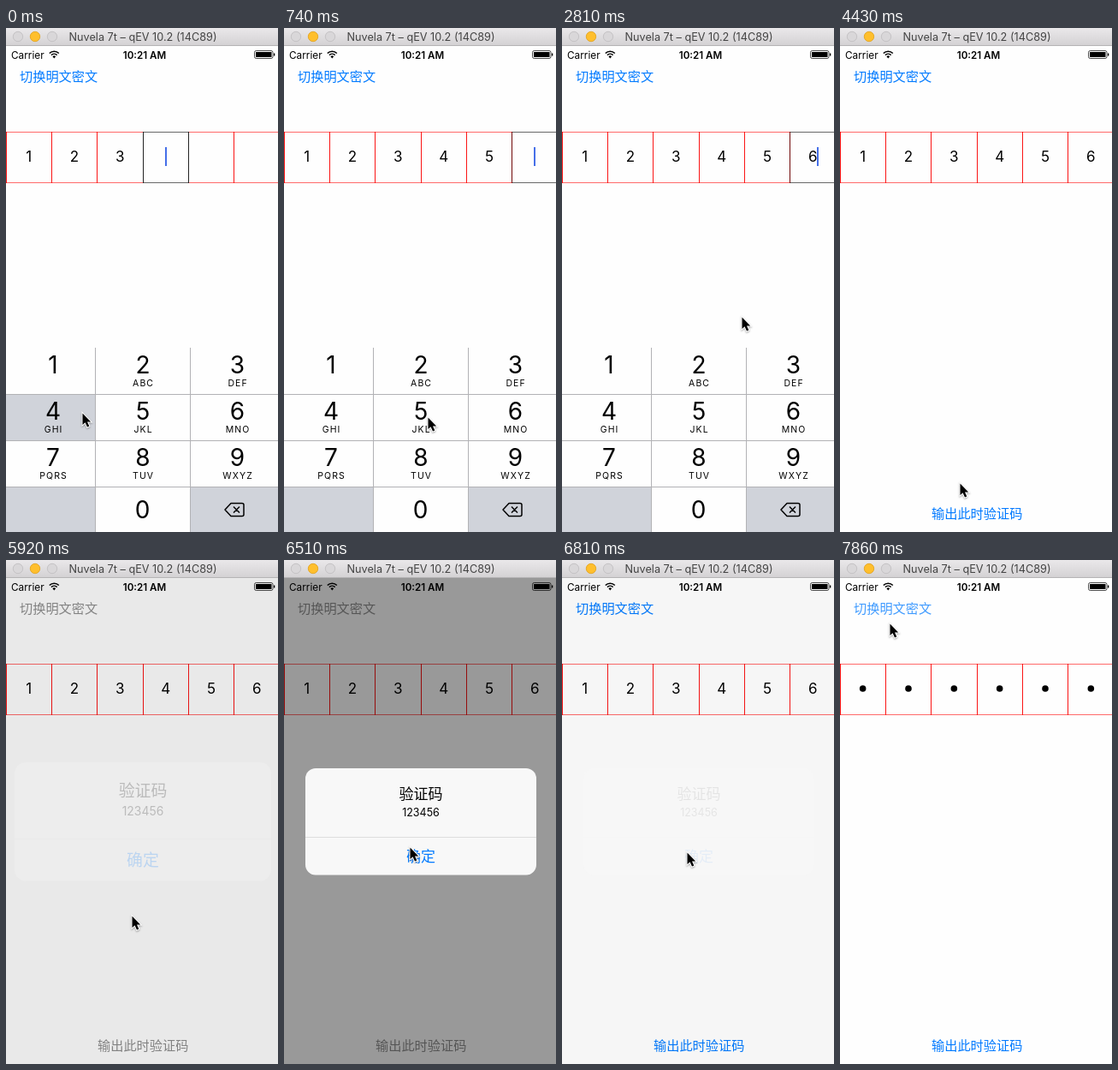
Write an HTML page with a canvas that moves like this. It is 318 px wide and 588 px high and loops after 8000 ms.

```html
<!DOCTYPE html>
<html lang="zh">
<head>
<meta charset="utf-8">
<style>
  html, body { margin: 0; width: 100%; height: 100%; overflow: hidden; background: #fefefe; }
  canvas { display: block; }
</style>
</head>
<body>
<canvas id="stage" width="318" height="588"></canvas>
<script>
const ctx = document.getElementById('stage').getContext('2d');
const LOOP = 8000, STEP = 148;
const LATIN = 'Inter, Roboto, sans-serif';
const CJK = '"Noto Sans CJK SC", "Noto Sans CJK", sans-serif';
const BLUE = '#007aff', KEY_GRAY = '#d0d3da';

// Pointer path: time, x, y of the tip.
const PATH = [
  [0, 89, 449], [300, 105, 450], [590, 162, 454], [740, 168, 454], [1036, 246, 452],
  [1184, 252, 453], [1480, 252, 453], [1776, 258, 569], [1924, 252, 560], [2220, 218, 380],
  [2368, 212, 338], [2812, 210, 337], [3108, 140, 332], [3400, 103, 325], [3850, 103, 325],
  [4144, 122, 440], [4440, 140, 531], [4736, 148, 562], [5180, 148, 562], [5620, 147, 415],
  [5920, 147, 415], [6220, 148, 342], [6512, 147, 335], [6660, 146, 340], [6808, 146, 341],
  [6956, 92, 128], [7252, 56, 76], [7400, 48, 58], [7696, 48, 58], [7844, 58, 74]
];
// Digit, press time, entry time.
const TYPED = [[4, 0, 148], [5, 590, 735], [6, 1030, 1180]];
const KEYBOARD_HIDE = 3680;
const LETTERS = ['', 'ABC', 'DEF', 'GHI', 'JKL', 'MNO', 'PQRS', 'TUV', 'WXYZ'];
const COLUMNS = [0, 105, 216, 318], KEY_X = [55, 160, 270.5];

const clamp = v => Math.max(0, Math.min(1, v));
const progress = (t, from, to) => clamp((t - from) / (to - from));
const within = (t, from, to) => t >= from && t < to;

function pointerAt(t) {
  const i = PATH.findIndex(p => p[0] > t);
  if (i < 0) return PATH[PATH.length - 1].slice(1);
  const [t0, x0, y0] = PATH[i - 1], [t1, x1, y1] = PATH[i];
  const p = (t - t0) / (t1 - t0);
  return [x0 + (x1 - x0) * p, y0 + (y1 - y0) * p];
}

function rect(color, x, y, w, h) {
  ctx.fillStyle = color;
  ctx.fillRect(x, y, w, h);
}

function circle(x, y, r, fill, stroke) {
  ctx.beginPath();
  ctx.arc(x, y, r, 0, Math.PI * 2);
  ctx.fillStyle = fill;
  ctx.fill();
  if (stroke) { ctx.strokeStyle = stroke; ctx.lineWidth = 1; ctx.stroke(); }
}

function text(str, x, y, size, { color = '#000', family = LATIN, weight = 400, align = 'center', spacing = 0 } = {}) {
  ctx.font = `${weight} ${size}px ${family}`;
  ctx.textAlign = align;
  ctx.letterSpacing = spacing + 'px';
  ctx.fillStyle = color;
  ctx.fillText(str, x, y);
}

function titleBar() {
  const shade = ctx.createLinearGradient(0, 0, 0, 20);
  shade.addColorStop(0, '#eae8ea');
  shade.addColorStop(1, '#d4d2d4');
  rect(shade, 0, 0, 318, 20);
  rect('#b5b4b5', 0, 20, 318, 1);
  circle(14, 10, 5.7, '#d9d7d9', '#c5c3c5');
  circle(34, 10, 5.7, '#ffbf2d', '#e5a92a');
  circle(54, 10, 5.7, '#d9d7d9', '#c5c3c5');
  text('Nuvela 7t – qEV 10.2 (14C89)', 160, 15, 12.7, { color: '#444' });
}

function statusBar() {
  text('Carrier', 6, 35.5, 11.8, { align: 'left' });
  text('10:21 AM', 162, 35.5, 11.6, { weight: 600 });
  ctx.strokeStyle = '#000';
  ctx.lineWidth = 1.6;
  for (const r of [4.7, 7.8]) {
    ctx.beginPath();
    ctx.arc(56.3, 35, r, Math.PI * 1.25, Math.PI * 1.75);
    ctx.stroke();
  }
  ctx.beginPath();
  ctx.moveTo(56.3, 35.5);
  ctx.arc(56.3, 35, 2.6, Math.PI * 1.25, Math.PI * 1.75);
  ctx.fillStyle = '#000';
  ctx.fill();
  ctx.lineWidth = 0.7;
  ctx.beginPath();
  ctx.roundRect(290.5, 26.5, 21.5, 9, 2);
  ctx.stroke();
  rect('#000', 292, 28, 18.5, 6);
  rect('#000', 313, 29.5, 1.3, 3);
}

function linkButton(label, x, y, alpha, color) {
  ctx.globalAlpha = alpha;
  text(label, x, y, 15.2, { color, family: CJK, align: 'left' });
  ctx.globalAlpha = 1;
}

// Touch highlight: dimmed while held, fading back after release.
function heldAlpha(t, press, release) {
  if (t < press) return 1;
  return t < release ? 0.25 : 0.25 + 0.75 * progress(t, release, release + 230);
}

function codeField(t, masked) {
  const count = 3 + TYPED.filter(k => t >= k[2]).length;
  const active = t < KEYBOARD_HIDE ? Math.min(count, 5) : -1;
  const left = i => Math.floor(i * 320 / 6);
  const outline = (i, color, edge) => {
    const x = left(i), w = left(i + 1) - x;
    rect(color, x, 121, w + 1, 1);
    rect(color, x, 180, w + 1, 1);
    rect(edge, x, 121, 1, 60);
    rect(edge, x + w, 121, 1, 60);
  };
  for (let i = 0; i < 6; i++) outline(i, '#ff6a6a', '#fa1414');
  if (active >= 0) outline(active, '#686868', active === 5 ? '#700808' : '#222');
  for (let i = 0; i < count; i++) {
    const x = (i + 0.5) * 320 / 6;
    if (masked) circle(x, 150, 3.8, '#000');
    else text(i + 1, x, 156, 17);
  }
  const blinkOff = within(t, 1780, 2180) || within(t, 2880, 3250);
  if (active >= 0 && !blinkOff) rect('#466fe8', count === 6 ? 298 : left(active) + 26, 139, 2, 22);
}

function deleteIcon() {
  ctx.strokeStyle = '#000';
  ctx.lineWidth = 1.5;
  ctx.lineJoin = 'round';
  ctx.stroke(new Path2D('M256 562 L263 554.5 H276 Q278 554.5 278 556.5 V567.5 Q278 569.5 276 569.5 H263 Z M266 558.5 L273 565.5 M273 558.5 L266 565.5'));
}

function keyboard(t) {
  const p = progress(t, KEYBOARD_HIDE, 3990);
  if (p >= 1) return;
  ctx.save();
  ctx.beginPath();
  ctx.rect(0, 21, 318, 567);
  ctx.clip();
  ctx.translate(0, 216 * (1 - (1 - p) ** 2));
  rect('#fefefe', 0, 373, 318, 215);
  rect(KEY_GRAY, 0, 536, 104, 52);
  rect(KEY_GRAY, 216, 536, 102, 52);
  for (const [digit, press, entry] of TYPED) {
    const col = (digit - 1) % 3;
    if (within(t, press, entry)) rect(KEY_GRAY, COLUMNS[col], 428, COLUMNS[col + 1] - COLUMNS[col], 53);
  }
  for (const y of [427, 481, 535]) rect('#b2b2b5', 0, y, 318, 1);
  for (const x of [104, 215]) rect('#b2b2b5', x, 373, 1, 215);
  LETTERS.forEach((letters, i) => {
    const x = KEY_X[i % 3], y = 373 + 54 * Math.floor(i / 3);
    text(i + 1, x, y + 30, 28);
    text(letters, x + 0.6, y + 45, 10.5, { spacing: 1.1 });
  });
  text(0, 159.5, 572, 28);
  deleteIcon();
  ctx.restore();
}

function alertBox(t) {
  const shown = progress(t, 5880, 6070);
  const alpha = shown * (1 - progress(t, 6660, 6820));
  if (!alpha) return;
  rect(`rgba(0,0,0,${0.4 * alpha})`, 0, 21, 318, 567);
  const scale = 1 + 0.18 * (1 - shown) ** 2;
  ctx.save();
  ctx.globalAlpha = alpha;
  ctx.translate(160, 305);
  ctx.scale(scale, scale);
  ctx.translate(-160, -305);
  ctx.beginPath();
  ctx.roundRect(25, 243, 270, 124.5, 12);
  ctx.fillStyle = '#f8f8f8';
  ctx.fill();
  ctx.clip();
  if (t >= 6600) rect('#e9e9e9', 25, 324, 270, 44);
  rect('#dedede', 25, 323, 270, 1);
  text('验证码', 160, 279, 17, { family: CJK, weight: 500 });
  text('123456', 160, 299, 12.5);
  text('确定', 160, 351.5, 17, { family: CJK, color: BLUE });
  ctx.restore();
}

function pointer(x, y) {
  ctx.save();
  ctx.translate(Math.round(x), Math.round(y));
  ctx.shadowColor = 'rgba(0,0,0,.35)';
  ctx.shadowBlur = 2;
  ctx.shadowOffsetY = 1;
  const arrow = new Path2D('M.5 .5 V14 L3.6 11.2 L6 16.6 L8.3 15.6 L6 10.4 H10.2 Z');
  ctx.strokeStyle = '#fff';
  ctx.lineWidth = 2;
  ctx.lineJoin = 'miter';
  ctx.stroke(arrow);
  ctx.shadowColor = 'transparent';
  ctx.fillStyle = '#000';
  ctx.fill(arrow);
  ctx.restore();
}

function draw(t) {
  rect('#fefefe', 0, 0, 318, 588);
  statusBar();
  const tint = within(t, 5900, 6700) ? '#8e8e8e' : BLUE;
  linkButton('切换明文密文', 16, 62, heldAlpha(t, 7480, 7690), tint);
  linkButton('输出此时验证码', 107, 572, heldAlpha(t, 4870, 5180), tint);
  codeField(t, t >= 7690);
  keyboard(t);
  alertBox(t);
  titleBar();
  pointer(...pointerAt(t));
}

function tick() {
  const t = performance.now() % LOOP;
  draw(Math.min(53, Math.floor((t + 18) / 148.2)) * STEP);
  requestAnimationFrame(tick);
}
tick();
</script>
</body>
</html>
```
